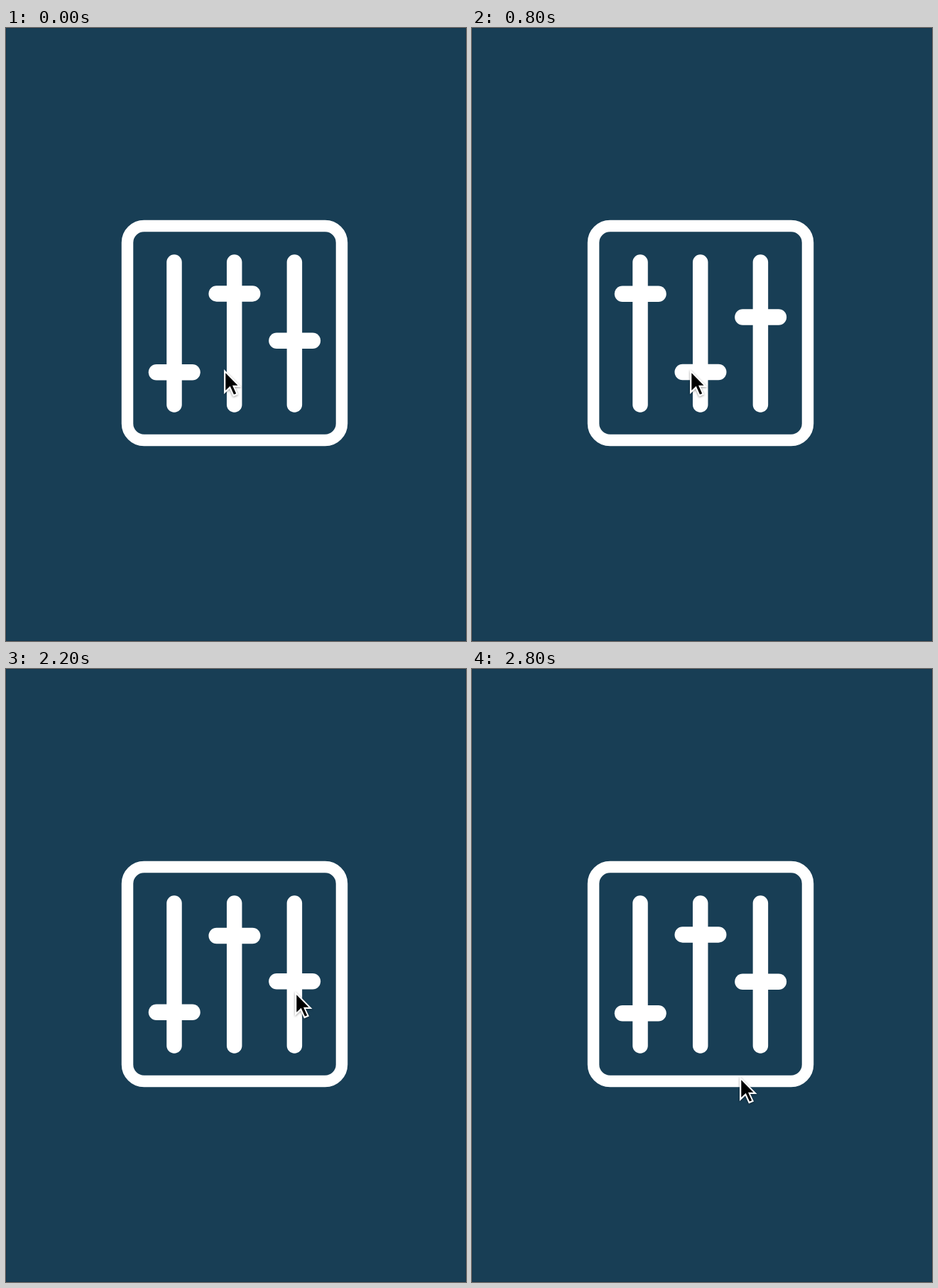
Write an HTML page that moves like this. It is 648 by 864 pixels and loops after 2.84 s.

```html
<!DOCTYPE html>
<html lang="en">
<head>
<meta charset="utf-8">
<title>Sliders</title>
<style>
  html, body { margin: 0; width: 100%; height: 100%; overflow: hidden; background: #183e55; }
  svg { display: block; width: 648px; height: 864px; }
  #cursor { filter: drop-shadow(0 1.5px 1.5px rgba(0, 0, 0, .4)); }
</style>
</head>
<body>
<svg viewBox="0 0 648 864">
  <rect x=".5" y=".5" width="647" height="863" fill="#183e55" stroke="#14364d"/>
  <g fill="none" stroke="#fff" stroke-linecap="round">
    <rect x="171" y="279" width="302" height="302" rx="23.5" stroke-width="16.5"/>
    <path d="M237 330V531M321.7 330V531M406.4 330V531" stroke-width="21.5"/>
    <g stroke-width="22.5">
      <path class="knob" d="M212 485.3h50.5"/>
      <path class="knob" d="M296.7 374.4h50.5"/>
      <path class="knob" d="M381.4 440.8h50.5"/>
    </g>
  </g>
  <g id="cursor">
    <path d="M0 0V35L8 27.5L13 38.5L20 35.5L15 25H24.5Z" fill="#fff"/>
    <path d="M2.3 5.2V29.8L8.7 23.8L14 35.6L17.2 34.2L12 22.7H19.5Z" fill="#000"/>
  </g>
</svg>
<script>
const LOOP = 2840, HALF = 300;
const CLICKS = [525, 2193];
const TRAVEL = [-111, 111, -33.5];
// Cursor moves: start, end, from x, y, to x, y
const MOVES = [
  [1130, 1450, 307, 481, 406, 588],
  [1530, 1850, 406, 588, 407, 454],
  [2640, 2720, 407, 454, 397, 504, x => x ** 1.5],
  [2720, 2800, 397, 504, 377, 574, x => x],
];

const knobs = document.querySelectorAll('.knob');
const cursor = document.getElementById('cursor');
const clamp = x => Math.min(1, Math.max(0, x));
const smooth = x => x * x * (3 - 2 * x);
const bezier = (a, b, s) => 3 * a * s * (1 - s) ** 2 + 3 * b * s * s * (1 - s) + s ** 3;

// Same curve as the CSS "ease" keyword
function ease(x) {
  let low = 0, high = 1;
  for (let i = 0; i < 20; i++) {
    const mid = (low + high) / 2;
    if (bezier(.25, .25, mid) < x) low = mid; else high = mid;
  }
  return bezier(.1, 1, low);
}

function shift(t) {
  return CLICKS.reduce((sum, start) =>
    sum + ease(clamp((t - start) / HALF)) - ease(clamp((t - start - HALF) / HALF)), 0);
}

function cursorAt(t) {
  const [start, end, x0, y0, x1, y1, curve = smooth] = MOVES.findLast(m => t >= m[0]) || MOVES[0];
  const p = curve(clamp((t - start) / (end - start)));
  return [x0 + (x1 - x0) * p, y0 + (y1 - y0) * p];
}

function draw() {
  const t = performance.now() % LOOP;
  const s = shift(t);
  knobs.forEach((knob, i) => knob.setAttribute('transform', `translate(0 ${TRAVEL[i] * s})`));
  cursor.setAttribute('transform', `translate(${cursorAt(t)})`);
  requestAnimationFrame(draw);
}
draw();
</script>
</body>
</html>
```
